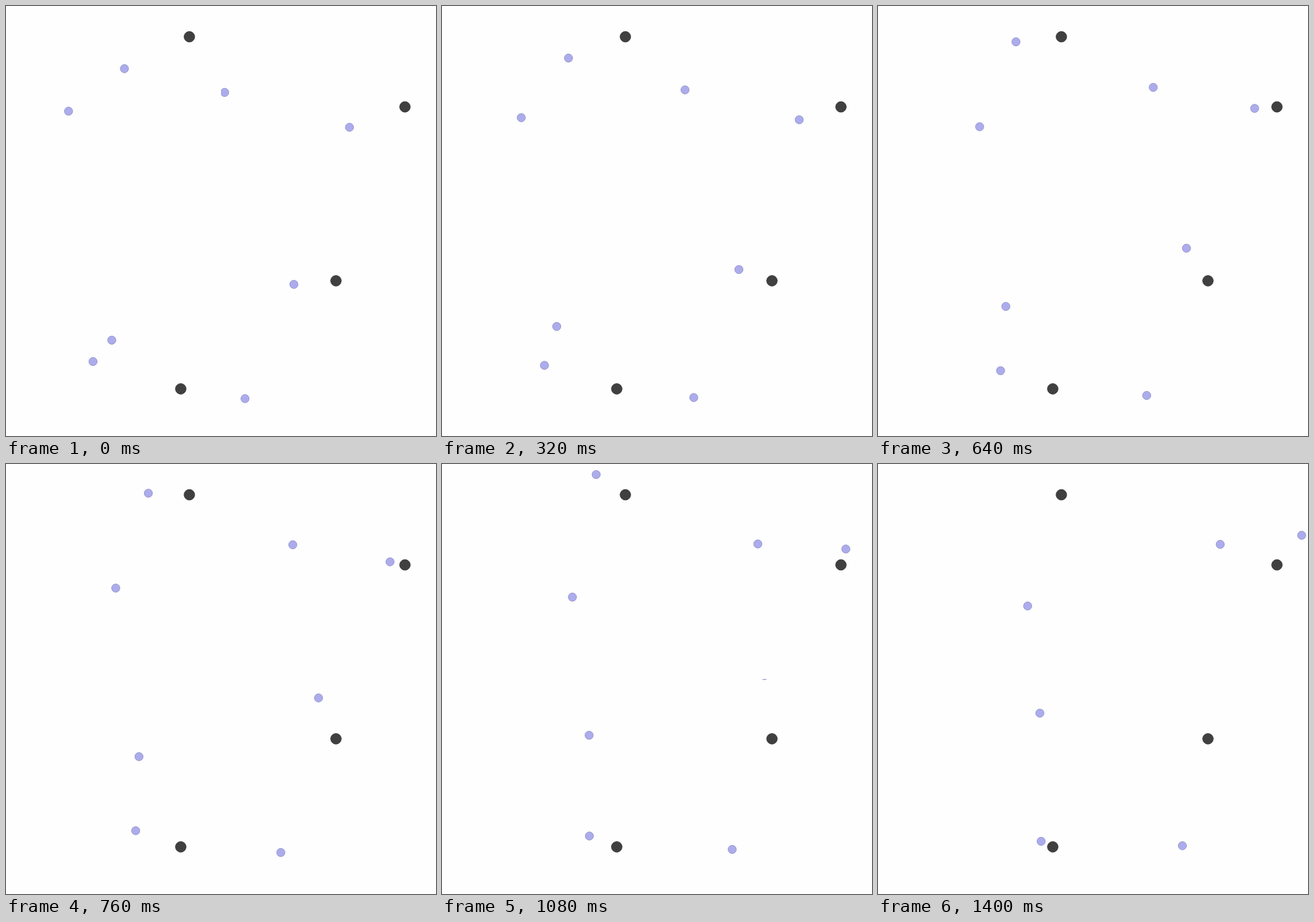
Write an HTML page with a canvas that moves like this. It is 748 px wide and 748 px high and loops after 1440 ms.

```html
<!DOCTYPE html>
<html lang="en">
<head>
<meta charset="utf-8">
<title>Drifting dots</title>
<style>
  html, body { margin: 0; width: 100%; height: 100%; overflow: hidden; background: #fefefe; }
  canvas { display: block; }
</style>
</head>
<body>
<canvas id="stage" width="748" height="748"></canvas>
<script>
const ctx = document.getElementById('stage').getContext('2d');
const SIZE = 748, CELL = SIZE / 2, STEP = 40, STEPS = 36;

// The motion starts slowly, then runs at an even pace.
const pace = step => step + 2.5 * Math.exp(-step / 2.5);
const first = pace(0), middle = pace(16), last = pace(STEPS - 1);

const anchors = [[319, 53.5], [694, 175.5], [574, 478], [304, 666]];

// Each path is a parabola through a start, a middle and an end point.
const paths = [
  [[206, 109], [240, 62.3], [289, -17]],
  [[108.8, 183], [176.8, 210], [260.3, 247]],
  [[380.3, 150.3], [478.8, 141.6], [595.3, 139.8]],
  [[597.5, 211], [655.2, 178.1], [737, 124]],
  [[500.8, 484.2], [536.6, 421.3], [576, 328]],
  [[415.8, 683], [467.4, 677.5], [529.5, 664]],
  [[184, 581.3], [222.4, 522.6], [281.6, 433.4]],
  [[151.4, 618.5], [213.2, 634.4], [283.8, 656.3]]
];

function along([start, mid, end], u) {
  const a = (u - middle) * (u - last) / ((first - middle) * (first - last));
  const b = (u - first) * (u - last) / ((middle - first) * (middle - last));
  const c = 1 - a - b;
  return [0, 1].map(axis => a * start[axis] + b * mid[axis] + c * end[axis]);
}

function dot([x, y], radius, fill, stroke) {
  ctx.beginPath();
  ctx.arc(x, y, radius, 0, Math.PI * 2);
  ctx.fillStyle = fill;
  ctx.fill();
  ctx.strokeStyle = stroke;
  ctx.lineWidth = 1;
  ctx.stroke();
}

// A mover is visible only inside the quarter of the stage where it starts.
function drawMover(path, u) {
  const [left, top] = path[0].map(v => Math.floor(v / CELL) * CELL);
  ctx.save();
  ctx.beginPath();
  ctx.rect(left, top, CELL, CELL);
  ctx.clip();
  dot(along(path, u), 7.2, '#acacec', '#9292cc');
  ctx.restore();
}

function draw(now) {
  const step = Math.floor(now / STEP) % STEPS;
  ctx.fillStyle = '#fefefe';
  ctx.fillRect(0, 0, SIZE, SIZE);
  for (const path of paths) drawMover(path, pace(step));
  for (const anchor of anchors) dot(anchor, 9.3, '#404040', '#3c3c3c');
}

const startTime = performance.now();
function tick() {
  draw(performance.now() - startTime);
  requestAnimationFrame(tick);
}
tick();
</script>
</body>
</html>
```
